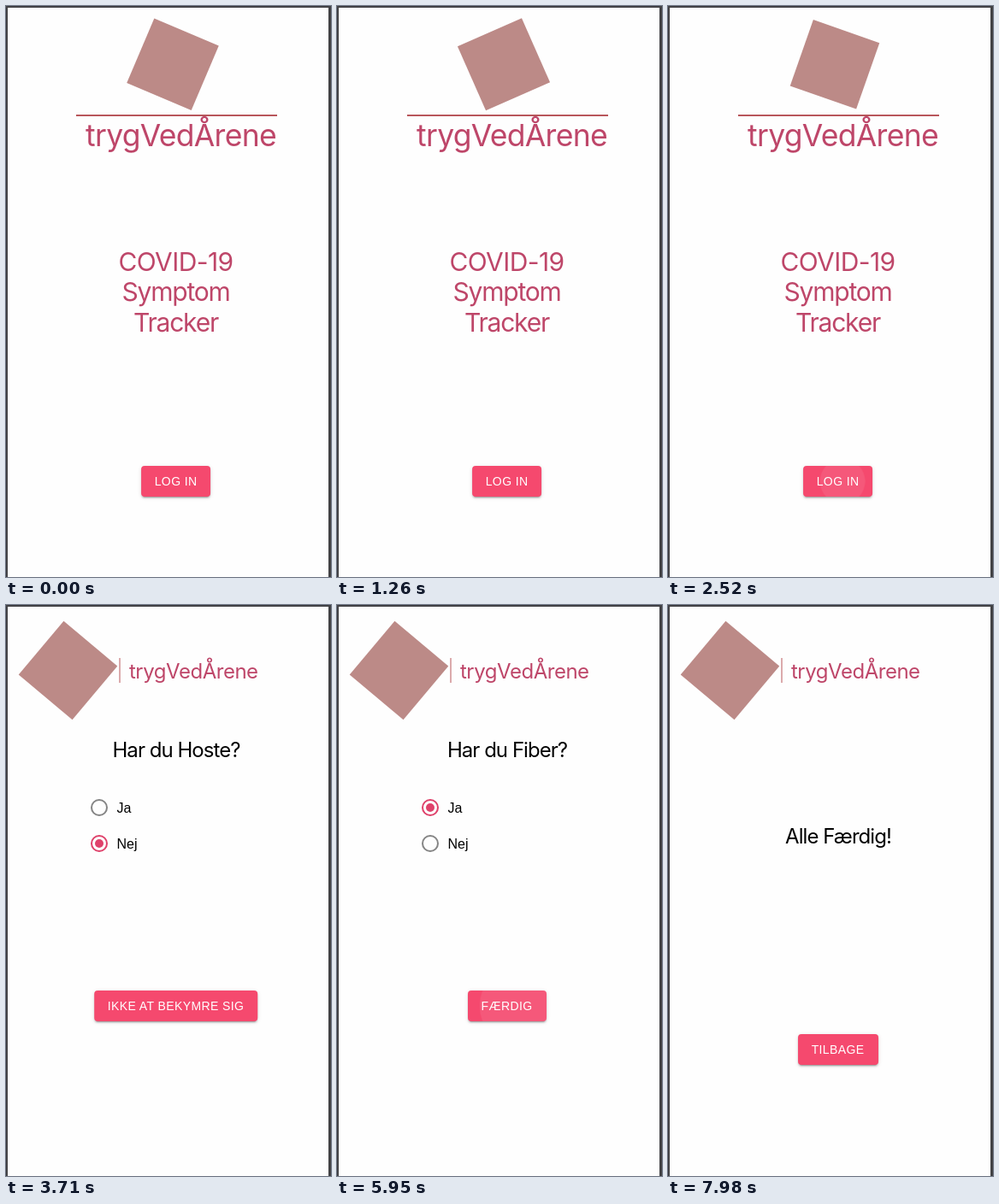
These frames come from a looping animation (380 px wide and 668 px high, 8 s). An HTML page:

```html
<!DOCTYPE html>
<html lang="da">
<head>
<meta charset="utf-8">
<title>Symptom Tracker</title>
<style>
  html, body { margin: 0; width: 100%; height: 100%; overflow: hidden; background: #fefefe; }
  .stage { position: relative; width: 380px; height: 668px; overflow: hidden; background: #fefefe; }
  svg { position: absolute; inset: 0; }
  text { font-family: Inter, Roboto, sans-serif; letter-spacing: -.04em; }
  .brand { fill: #be4669; }
  .loose { letter-spacing: -.02em; }
  .middle { text-anchor: middle; }
  .label { font: 16px "Liberation Sans", sans-serif; letter-spacing: 0; }
  .tile { fill: #bc8a87; }
  .ring { fill: none; stroke: #858585; stroke-width: 2; }
  .dot { fill: #df426b; }

  .button {
    position: absolute; left: 198.6px; transform: translateX(-50%);
    padding: 6px 16px; border-radius: 4px; overflow: hidden; white-space: nowrap;
    font: 14px/24px "Liberation Sans", Arial, sans-serif; letter-spacing: .4px;
    color: #fff; background: #f5496e;
    box-shadow: 0 3px 1px -2px #0003, 0 2px 2px #00000024, 0 1px 5px #0000001f;
  }
  .button i {
    position: absolute; left: calc(50% + var(--dx) - 49px); top: calc(50% - 49px);
    width: 98px; height: 98px; border-radius: 50%; background: #fff;
  }
  .button i, .press {
    opacity: 0;
    animation: ripple 8s infinite; animation-delay: calc(var(--at) - 8s);
  }
  .press { transform-box: fill-box; transform-origin: center; }

  /* Visibility of each part of the flow */
  .login, .header, .quiz, .cough, .no, .next, .fever, .done { animation: 8s step-end infinite; }
  .login { animation-name: login; }
  .header { animation-name: header; }
  .quiz { animation-name: quiz; }
  .cough { animation-name: cough; }
  .no { animation-name: no; }
  .next { animation-name: next; }
  .fever { animation-name: fever; }
  .done { animation-name: done; }
  @keyframes login { 0% { visibility: visible } 32.375%, 100% { visibility: hidden } }
  @keyframes header { 0% { visibility: hidden } 32.375%, 100% { visibility: visible } }
  @keyframes quiz { 0%, 96.25%, 100% { visibility: hidden } 32.375% { visibility: visible } }
  @keyframes cough { 0%, 72.625%, 100% { visibility: hidden } 32.375% { visibility: visible } }
  @keyframes no { 0%, 50.75%, 100% { visibility: hidden } 32.375% { visibility: visible } }
  @keyframes next { 0%, 72.625%, 100% { visibility: hidden } 50.75% { visibility: visible } }
  @keyframes fever { 0%, 96.25%, 100% { visibility: hidden } 72.625% { visibility: visible } }
  @keyframes done { 0% { visibility: hidden } 96.25%, 100% { visibility: visible } }

  .spin { animation: spin 8s linear infinite; }
  @keyframes spin { from { transform: rotate(23deg) } to { transform: rotate(297deg) } }

  .ring.yes { animation: ring-yes 8s step-end infinite; }
  .ring.nej { animation: ring-nej 8s step-end infinite; }
  .dot.yes { animation: dot-yes 8s linear infinite; }
  .dot.nej { animation: dot-nej 8s linear infinite; }
  @keyframes ring-yes { 0% { stroke: #858585 } 50.75%, 100% { stroke: #df426b } }
  @keyframes ring-nej { 0% { stroke: #df426b } 50.75%, 100% { stroke: #858585 } }
  @keyframes dot-yes { 0%, 50.75% { transform: scale(0) } 52.625%, 100% { transform: scale(1) } }
  @keyframes dot-nej { 0%, 50.75% { transform: scale(1) } 52.625%, 100% { transform: scale(0) } }

  @keyframes ripple {
    0% { transform: scale(0); opacity: .09; animation-timing-function: cubic-bezier(.4, 0, .2, 1) }
    5.5% { opacity: .09 }
    6.875% { transform: scale(1) }
    9%, 100% { transform: scale(1); opacity: 0 }
  }

  .frame { position: absolute; inset: 0; border: solid #424245; border-width: 2px 3px 0 2px; }
</style>
</head>
<body>
<div class="stage">
  <svg width="380" height="668" viewBox="0 0 380 668">
    <g class="login">
      <g transform="translate(195 68.3)"><rect class="tile spin" x="-41" y="-41" width="82" height="82"/></g>
      <rect x="82" y="127" width="235" height="2" fill="#b8565b"/>
      <g class="brand middle">
        <text class="loose" x="204.5" y="164" font-size="35.5">trygVedÅrene</text>
        <g font-size="30">
          <text class="loose" x="198.5" y="310">COVID-19</text>
          <text x="198.5" y="345">Symptom</text>
          <text x="198.5" y="381">Tracker</text>
        </g>
      </g>
    </g>

    <g class="header">
      <rect class="tile" x="-41" y="-41" width="82" height="82" transform="translate(72.5 76.5) rotate(40)"/>
      <rect x="132.5" y="62" width="1" height="29" fill="#b8565b"/>
      <text class="brand loose" x="144" y="86" font-size="24">trygVedÅrene</text>
    </g>

    <g class="middle" font-size="24">
      <text class="cough" x="199" y="178">Har du Hoste?</text>
      <text class="fever" x="199" y="178">Har du Fiber?</text>
      <text class="done" x="199" y="279">Alle Færdig!</text>
    </g>

    <g class="quiz">
      <g transform="translate(109 237)">
        <circle class="press" r="13" fill="#df426b" style="--at: 3.71s"/>
        <circle class="ring yes" r="9"/>
        <circle class="dot yes" r="5"/>
        <text class="label" x="20.5" y="5.5">Ja</text>
      </g>
      <g transform="translate(109 279)">
        <circle class="ring nej" r="9"/>
        <circle class="dot nej" r="5"/>
        <text class="label" x="20.5" y="5.5">Nej</text>
      </g>
    </g>
  </svg>

  <div class="button login" style="top: 538px">LOG IN<i style="--at: 2.32s; --dx: 5px"></i></div>
  <div class="button no" style="top: 451px">IKKE AT BEKYMRE SIG</div>
  <div class="button next" style="top: 451px">NÆSTE<i style="--at: 5.53s; --dx: 15px"></i></div>
  <div class="button fever" style="top: 451px">FÆRDIG<i style="--at: 5.53s; --dx: 15px"></i><i style="--at: 7.42s; --dx: 8px"></i></div>
  <div class="button done" style="top: 502px">TILBAGE</div>
  <div class="frame"></div>
</div>
</body>
</html>
```
